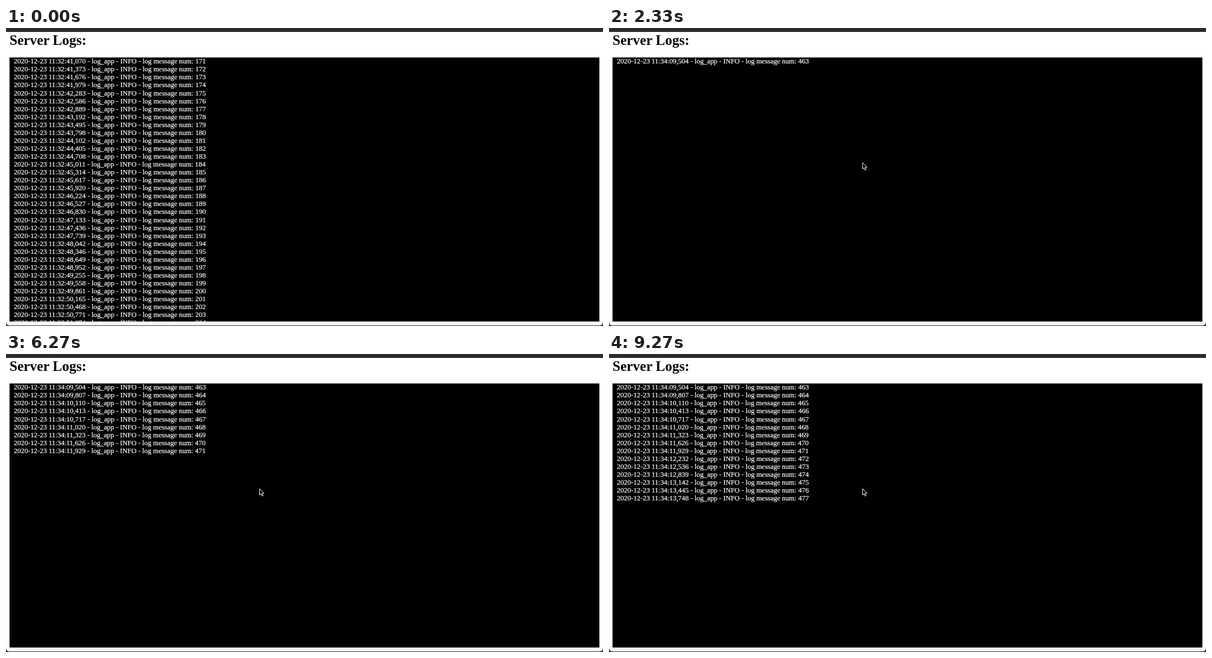
An HTML page that plays this animation: 1058x529 px, repeating every 9.34 s.

```html
<!DOCTYPE html>
<html lang="en">
<head>
<meta charset="utf-8">
<title>Server Logs</title>
<style>
  html, body { margin: 0; width: 100%; height: 100%; overflow: hidden; background: #2b2a2f; }
  .window {
    position: absolute; top: 7px; width: 1058px; height: 520.5px;
    overflow: hidden; border-radius: 0 0 6px 6px;
    background: linear-gradient(#fff 514px, #fff5fd 514px);
  }
  /* An ordinary 16px page, shown at 25/32 of its size. */
  .page {
    box-sizing: border-box; width: 1354.24px; padding: 0 8px;
    transform: scale(.78125); transform-origin: 0 0;
    font: 16px/18px "Liberation Serif", "Times New Roman", serif;
  }
  h1 { margin: 0 0 21.44px; font-size: 32px; line-height: 37px; }
  pre {
    margin: 0; box-sizing: border-box; height: 600px; padding: 0 10px; overflow: hidden;
    background: #000; color: #fff; font: inherit; -webkit-text-stroke: .3px #fff;
  }
  svg { position: absolute; left: 448px; top: 237px; }
</style>
</head>
<body>
<div class="window">
  <div class="page">
    <h1>Server Logs:</h1>
    <pre id="log"></pre>
  </div>
</div>
<svg id="pointer" width="12" height="18">
  <path d="M1.4 2V13.3L4 11 5.8 15.2 7.7 14.4 5.9 10.3H9.2Z" fill="#000" stroke="#fff"/>
</svg>
<script>
const LOOP = 9340, CLEAR = 1800;
const FRAME = 1000 / 15;                   // screen refresh, ms
const FIRST_LINE = 2185, LINE_EVERY = 503.5;
const LOG_GAP = 303.15;                    // ms between log stamps

const log = document.getElementById("log");
const pointer = document.getElementById("pointer");

// Log lines whose stamps start at startMs after 11:minute and advance evenly.
function logLines(count, minute, startMs, firstNum) {
  return Array.from({ length: count }, (_, i) => {
    const ms = Math.round(startMs + i * LOG_GAP);
    const sec = (ms / 1000).toFixed(3).padStart(6, "0").replace(".", ",");
    return `2020-12-23 11:${minute}:${sec} - log_app - INFO - log message num: ${firstNum + i}`;
  }).join("\n");
}

let shown = null;
function draw(t) {
  const frameTime = Math.floor((t + 4) / FRAME) * FRAME;
  const arrived = Math.max(0, 1 + Math.floor((frameTime - FIRST_LINE) / LINE_EVERY));
  const text = t < CLEAR ? logLines(34, 32, 41070, 171) : logLines(arrived, 34, 9504, 463);
  if (text !== shown) log.textContent = shown = text;
  pointer.style.visibility = arrived ? "visible" : "hidden";
}

function tick() {
  draw(performance.now() % LOOP);
  requestAnimationFrame(tick);
}
tick();
</script>
</body>
</html>
```
